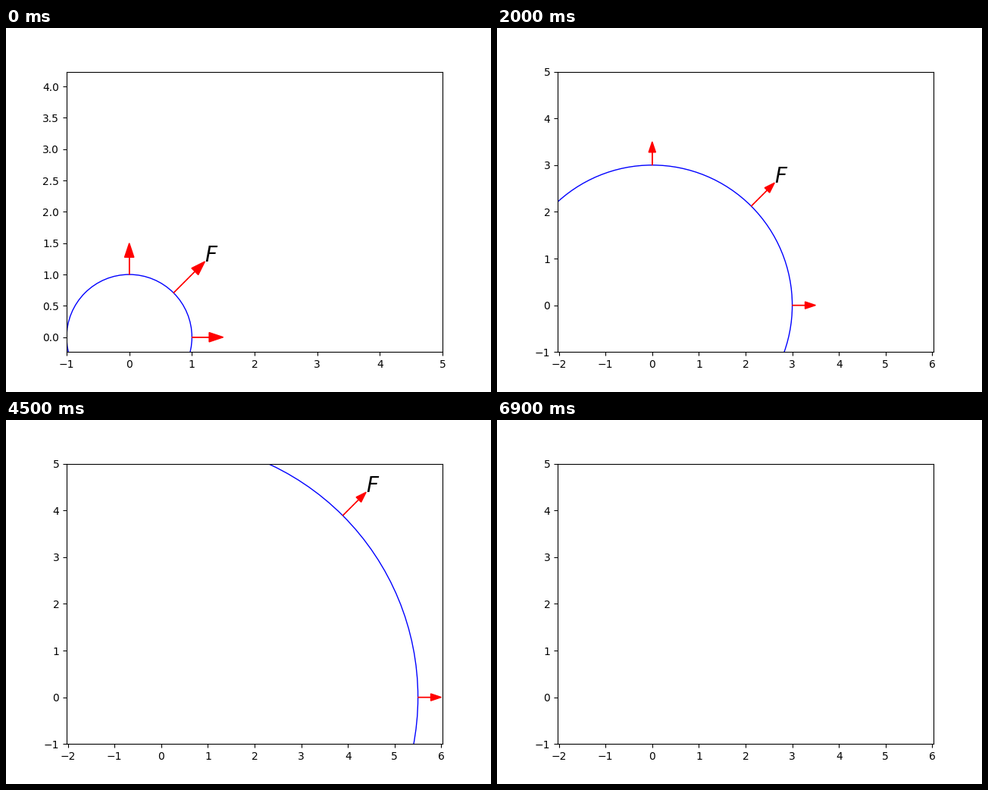
A matplotlib script that plays this animation: 640 by 480 pixels, repeating every 6.93 s.

```python
import numpy as np
import matplotlib.pyplot as plt
from matplotlib.animation import FuncAnimation
from matplotlib.patches import Circle, FancyArrow

plt.rcParams["font.family"] = "DejaVu Sans"
plt.rcParams["mathtext.fontset"] = "dejavusans"

LOOP, TICK, STEP = 6930, 30, 100   # ms
REACH = 0.5                        # arrow extent along each axis
CENTER, SPAN = 2, 6                # middle and size of the data window
FIT_RADIUS = 1.85                  # beyond this the view zooms out

fig = plt.figure(figsize=(6.4, 4.8), dpi=100)
ax = fig.add_axes([0.125, 0.11, 0.775, 0.77])
ASPECT = (0.77 * 480) / (0.775 * 640)

DIRECTIONS = [(1, 0), (np.sqrt(0.5), np.sqrt(0.5)), (0, 1)]


def window(size):
    return CENTER - size / 2, CENTER + size / 2


def make_arrow(ux, uy):
    arrow = FancyArrow(ux, uy, REACH * np.sign(ux), REACH * np.sign(uy),
                       width=0.001, head_width=0.15, head_length=0.225,
                       length_includes_head=True, color="red",
                       linewidth=1, joinstyle="bevel")
    return ax.add_patch(arrow)


circle = ax.add_patch(Circle((0, 0), 1, fill=False, color="blue", linewidth=1))
arrows = [make_arrow(*d) for d in DIRECTIONS]
label = ax.text(0, 0, "$F$", fontsize=20)


def set_view(radius):
    """Keep equal axis scales, fitting the width first and the height later."""
    if radius < FIT_RADIUS:
        ax.set_xlim(*window(SPAN))
        ax.set_ylim(*window(SPAN * ASPECT))
    else:
        ax.set_xlim(*window(SPAN / ASPECT))
        ax.set_ylim(*window(SPAN))


def update(i):
    step = (i * TICK + TICK - 10) // STEP
    radius = 1 + 0.1 * min(step, 69)
    set_view(radius)
    circle.set_radius(radius)
    for arrow, (ux, uy) in zip(arrows, DIRECTIONS):
        arrow.set_data(x=radius * ux, y=radius * uy)
    tip = radius * np.sqrt(0.5) + REACH
    label.set_position((tip, tip))
    return [circle, label, *arrows]


anim = FuncAnimation(fig, update, frames=LOOP // TICK, interval=TICK,
                     init_func=lambda: update(0), repeat=True,
                     repeat_delay=0, blit=False)
plt.show()
```
